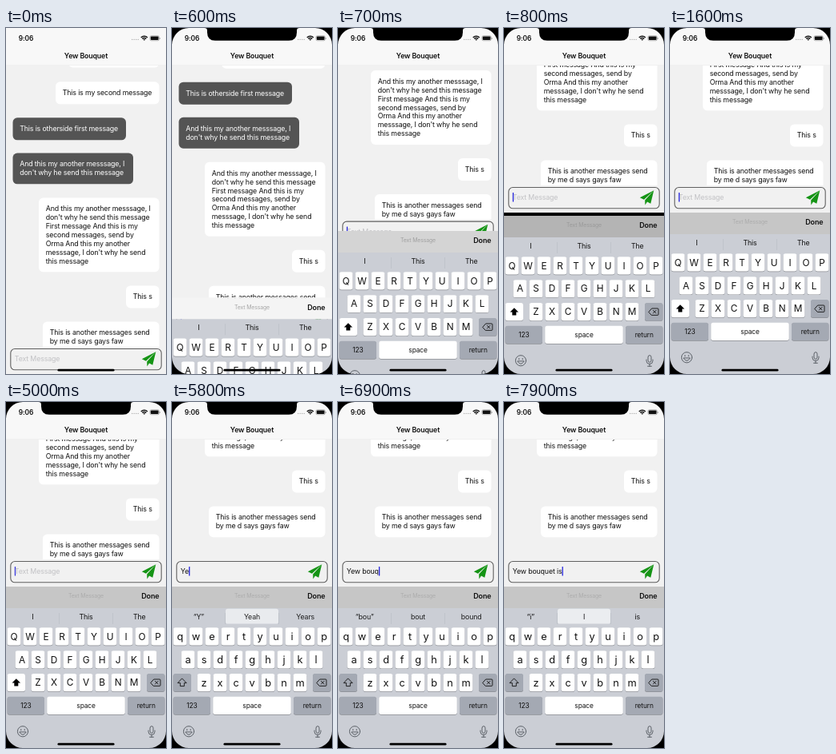
These frames come from a looping animation (200 px wide and 433 px high, 8000 ms). An HTML page with a canvas:

```html
<!DOCTYPE html>
<html lang="en">
<head>
<meta charset="utf-8">
<title>Chat keyboard</title>
<style>
html, body { margin: 0; height: 100%; overflow: hidden; background: #000; }
canvas { display: block; width: 200px; height: 433px; }
</style>
</head>
<body>
<canvas id="stage"></canvas>
<script>
const W = 200, H = 433, LOOP = 8000, KB_HEIGHT = 202;
const canvas = document.getElementById('stage');
const ctx = canvas.getContext('2d');
const dpr = window.devicePixelRatio || 1;
canvas.width = W * dpr;
canvas.height = H * dpr;

const TITLE = 'Yew Bouquet', TYPED = 'Yew bouquet is';
const KEY_TIMES = [5590, 5760, 6290, 6390, 6480, 6570, 6670, 6840, 7080, 7360, 7390, 7590, 7690, 7790];

// start time, three words, middle word highlighted
const SUGGESTIONS = [
  [-1000, ['I', 'This', 'The']],
  [5670, ['“Y”', 'Yeah', 'Years'], true],
  [5930, ['“Ye”', 'Yes', 'Yeah']],
  [6330, ['“Yew”', 'Yew', 'Yews']],
  [6430, ['is', 'and', 'for']],
  [6530, ['“b”', 'but', 'be']],
  [6630, ['“bo”', 'box', 'both']],
  [6770, ['“bou”', 'bout', 'bound']],
  [7010, ['“bouqu”', 'bouquet', 'bouquets'], true],
  [7610, ['is', 'and', 'for']],
  [7730, ['“i”', 'I', 'is'], true]
];

// x, y, width, dark, lines
const BUBBLES = [
  [78, 21.4, 113.5, false, ['']],
  [62, 67.3, 129.5, false, ['This is my second message']],
  [8.5, 112.3, 141.5, true, ['This is otherside first message']],
  [8.5, 156.5, 150.5, true, ['And this my another messsage, I', "don't why he send this message"]],
  [41, 212.5, 150.5, false, ['And this my another messsage, I', "don't why he send this message",
    'First message And this is my', 'second messages, send by', 'Orma And this my another',
    "messsage, I don't why he send", 'this message']],
  [150, 322.4, 41.5, false, ['This s']],
  [46, 367.4, 145.5, false, ['This is another messages send', 'by me d says gays faw']]
];

const clamp = v => Math.max(0, Math.min(1, v));
const ramp = (t, from, to) => clamp((t - from) / (to - from));
const smooth = p => p * p * (3 - 2 * p);
const mix = (a, b, p) => a + (b - a) * p;
const gray = v => `rgb(${v},${v},${v})`;

function text(s, x, y, { size = 8.8, color = '#111', align = 'left', weight = 400 } = {}) {
  ctx.font = `${weight} ${size}px Inter, "Liberation Sans", sans-serif`;
  ctx.letterSpacing = '-0.14px';
  ctx.textAlign = align;
  ctx.fillStyle = color;
  ctx.fillText(s, x, y + size * .35);
  return ctx.measureText(s).width;
}

function rect(x, y, w, h, color, r = 0) {
  ctx.fillStyle = color;
  ctx.beginPath();
  ctx.roundRect(x, y, w, h, r);
  ctx.fill();
}

function shape(d, x, y, { fill, stroke, width = .9 } = {}) {
  const path = new Path2D(d);
  ctx.save();
  ctx.translate(x, y);
  ctx.lineJoin = ctx.lineCap = 'round';
  if (fill) { ctx.fillStyle = fill; ctx.fill(path); }
  if (stroke) { ctx.strokeStyle = stroke; ctx.lineWidth = width; ctx.stroke(path); }
  ctx.restore();
}

function drawMessages(scroll) {
  ctx.save();
  ctx.beginPath();
  ctx.rect(0, 0, W, 399);
  ctx.clip();
  for (const [x, y, w, dark, lines] of BUBBLES) {
    const top = y - scroll;
    rect(x, top, w, 28 + (lines.length - 1) * 10.8, dark ? '#545454' : '#fff', 5.6);
    lines.forEach((line, i) => text(line, x + 8.7, top + 13.9 + i * 10.85, { color: dark ? '#fff' : '#111' }));
  }
  ctx.restore();
}

function drawInput(t, count) {
  ctx.strokeStyle = '#606060';
  ctx.lineWidth = 1.1;
  ctx.beginPath();
  ctx.roundRect(5.8, 401.5, 188.4, 26.3, 5.2);
  ctx.stroke();

  let caret = 10.8;
  if (count) caret += text(TYPED.slice(0, count), 10.8, 414) + .1;
  else text('Text Message', 10.8, 414, { color: '#c2c2c5' });

  shape('M18.3 0 L.8 9 L6 11.6 Z M18.3 0 L7.2 12.3 L7.4 18.4 L10 14.2 L14.3 16.6 Z', 169, 405.2, { fill: '#159415' });

  const phase = (t + 500) % 1000;
  const blink = phase < 500 ? ramp(phase, -30, 90) : 1 - ramp(phase, 480, 690);
  ctx.globalAlpha = t < 560 ? 0 : t < 900 || count ? 1 : blink;
  rect(caret, 408, 1.3, 11.6, '#2424dc', .5);
  ctx.globalAlpha = 1;
}

function drawHeader() {
  rect(0, 0, W, 47, '#f8f8f8');
  rect(0, 46.7, W, .4, '#d8d8d8');
  text(TITLE, 100, 35, { align: 'center', weight: 600 });
  text('9:06', 25, 12.7, { align: 'center', weight: 600, size: 8.4 });
  for (let i = 0; i < 4; i++) rect(157 + i * 2.5, 13.7, 1.4, 1.4, '#aaa', .7);
  for (const r of [2, 4.2, 6.4]) {
    ctx.strokeStyle = '#111';
    ctx.lineWidth = 1.5;
    ctx.beginPath();
    ctx.arc(172.8, 16, r - .7, -Math.PI * .75, -Math.PI * .25);
    ctx.stroke();
  }
  ctx.strokeStyle = '#888';
  ctx.lineWidth = .6;
  ctx.beginPath();
  ctx.roundRect(180, 9.8, 11.4, 6, 1.6);
  ctx.stroke();
  rect(180.8, 10.6, 9.8, 4.4, '#111', 1);
  rect(191.9, 12, .7, 2, '#888', .3);
}

function key(x, y, w, label, { dark = false, size = 8.4 } = {}) {
  rect(x, y - 10.7, w, 22.4, '#8a8d93', 2.7);
  rect(x, y - 11.2, w, 22.2, dark ? '#a4a9b3' : '#fff', 2.7);
  if (label) text(label, x + w / 2, y, { size, align: 'center' });
}

function drawSuggestions(t) {
  for (const x of [66.7, 133.3]) rect(x - .25, 264, .5, 14, '#b4b8bf');
  SUGGESTIONS.forEach(([start, words, pill], i) => {
    const next = SUGGESTIONS[i + 1];
    const gone = next ? ramp(t, next[0], next[0] + 100) : 0;
    const alpha = ramp(t, start, start + 140) * (1 - gone);
    if (!alpha) return;
    ctx.globalAlpha = alpha;
    if (pill) rect(67, 258.8, 66, 18.8, '#ebedf0', 2.7);
    words.forEach((word, n) => text(word, 33.3 + n * 66.7, 268.7, { align: 'center' }));
  });
  ctx.globalAlpha = 1;
}

function drawKeyboard(t, upper) {
  const bar = t < 800 ? mix(244, 180, ramp(t, 610, 790)) : mix(180, 198, ramp(t, 800, 1150));
  rect(0, 231, W, 27, gray(bar));
  rect(0, 258, W, 190, '#cbced5');
  text('Text Message', 100, 243, { size: 6.9, color: gray(bar - mix(78, 26, ramp(t, 600, 800))), align: 'center' });
  text('Done', 191.5, 243.2, { align: 'right', weight: 600, size: 9 });
  drawSuggestions(t);

  [['qwertyuiop', 10, 293.5], ['asdfghjkl', 20, 322.4], ['zxcvbnm', 40, 351.2]].forEach(([row, x, y]) =>
    [...row].forEach((c, i) =>
      key(x + i * 20 - 8.4, y, 16.8, upper ? c.toUpperCase() : c, { size: upper ? 11.8 : 12.8 })));

  key(1.6, 351.2, 22.4, '', { dark: !upper });
  shape('M0 -5 L5.3 .4 H2.5 V4.4 H-2.5 V.4 H-5.3 Z', 12.8, 351.2,
    upper ? { fill: '#000' } : { stroke: '#111' });
  key(176, 351.2, 22.4, '', { dark: true });
  shape('M-6 0 L-2.3 -4.2 H5 Q6 -4.2 6 -3.2 V3.2 Q6 4.2 5 4.2 H-2.3 Z M-.5 -1.8 L3.1 1.8 M3.1 -1.8 L-.5 1.8',
    187, 351.2, { stroke: '#111' });

  key(1.6, 380, 46.4, '123', { dark: true });
  key(51.2, 380, 97.6, 'space');
  key(152, 380, 46.4, 'return', { dark: true });

  const icon = { stroke: '#50555c' };
  shape('M6.6 0 A6.6 6.6 0 1 1 -6.6 0 A6.6 6.6 0 1 1 6.6 0 M-4 1 Q0 7.4 4 1 Z M-2.2 -2.8 V-1.4 M2.2 -2.8 V-1.4',
    21, 412.3, icon);
  shape('M-2 -4.6 A2 2 0 0 1 2 -4.6 V0 A2 2 0 0 1 -2 0 Z M-4 -1.2 V.2 A4 4 0 0 0 4 .2 V-1.2 M0 4.2 V7 M-2.4 7 H2.4',
    182, 412.3, icon);
}

function drawBezel() {
  shape('M40.5 0 Q44 0 44 3.2 V5.5 Q44 15.8 54 15.8 H146 Q156 15.8 156 5.5 V3.2 Q156 0 159.5 0 Z', 0, 0, { fill: '#000' });
  ctx.fillStyle = '#000';
  ctx.beginPath();
  ctx.rect(0, 0, W, H);
  ctx.roundRect(0, 0, W, H, 21);
  ctx.fill('evenodd');
}

function draw(t) {
  ctx.setTransform(dpr, 0, 0, dpr, 0, 0);
  rect(0, 0, W, H, '#000');
  const count = KEY_TIMES.filter(k => t >= k).length;

  ctx.save();
  ctx.translate(0, -KB_HEIGHT * smooth(ramp(t, 525, 775)));
  rect(0, 0, W, H, '#f1f1f1');
  drawMessages(35 * smooth(ramp(t, 5570, 5780)));
  drawInput(t, count);
  ctx.restore();

  drawHeader();

  // critically damped slide
  const s = Math.max(0, t - 526) * .0213;
  const offset = KB_HEIGHT * (1 + s) * Math.exp(-s);
  if (s > 0) {
    ctx.save();
    ctx.translate(0, offset < .2 ? 0 : offset);
    drawKeyboard(t, !count);
    ctx.restore();
  }
  rect(64.5, 426.8, 71, 2.7, '#000', 1.35);
  if (t >= 500) drawBezel();
}

const begin = performance.now();
function tick() {
  draw((performance.now() - begin) % LOOP);
  requestAnimationFrame(tick);
}
tick();
</script>
</body>
</html>
```
